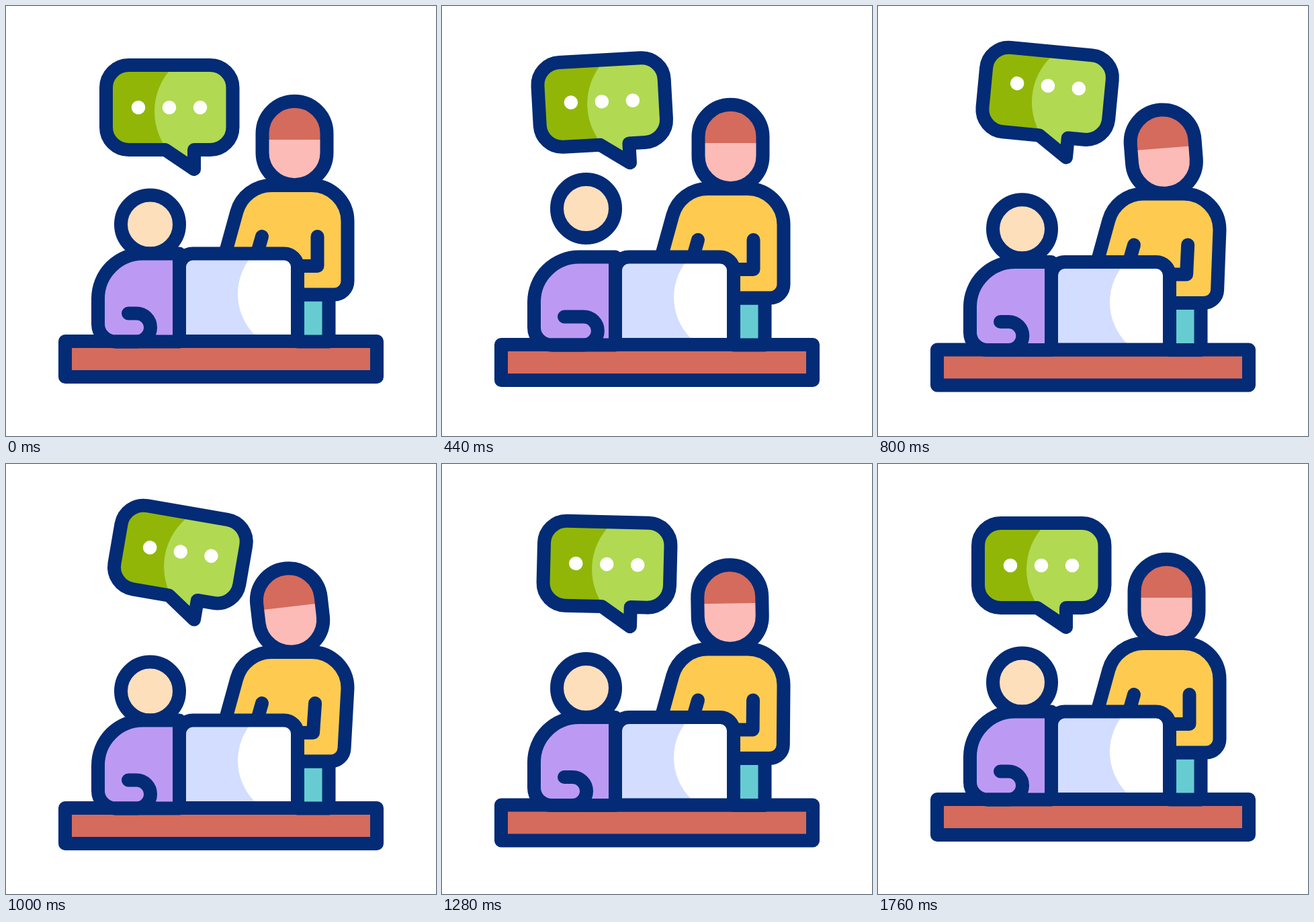
Animation of 640x640 px, one loop 2000 ms. Source, as an HTML page with a canvas:

```html
<!DOCTYPE html>
<html lang="en">
<head>
<meta charset="utf-8">
<title>Desk conversation</title>
<style>
  html, body { margin: 0; width: 100%; height: 100%; overflow: hidden; background: #fff; }
  canvas { display: block; width: 640px; height: 640px; }
</style>
</head>
<body>
<canvas id="stage"></canvas>
<script>
const SIZE = 640, LOOP = 2000, STEP = 40;
const color = {
  navy: '#032b76', brick: '#d56b5c', skin: '#fddfbb', pink: '#fdbbb7',
  yellow: '#fecb50', teal: '#67ccd1', purple: '#bc9af4',
  screen: '#d3ddff', green: '#91b608', lime: '#b1d952', white: '#fff'
};

const canvas = document.getElementById('stage');
const ctx = canvas.getContext('2d');
const ratio = window.devicePixelRatio || 1;
canvas.width = canvas.height = SIZE * ratio;

// Keyframes are [time, value] pairs joined by sine easing.
function track(t, keys) {
  if (t <= keys[0][0]) return keys[0][1];
  for (let i = 1; i < keys.length; i++) {
    const [t0, a] = keys[i - 1], [t1, b] = keys[i];
    if (t < t1) return a + (b - a) * (1 - Math.cos(Math.PI * (t - t0) / (t1 - t0))) / 2;
  }
  return keys[keys.length - 1][1];
}

function path(build) {
  const p = new Path2D();
  build(p);
  return p;
}

function roundRect(x, y, w, h, r) {
  return path(p => p.roundRect(x, y, w, h, r));
}

function circle(x, y, r) {
  return path(p => p.arc(x, y, r, 0, 2 * Math.PI));
}

function fill(shape, c) {
  ctx.fillStyle = c;
  ctx.fill(shape);
}

function outline(shape) {
  ctx.stroke(shape);
}

function solid(shape, c) {
  fill(shape, c);
  outline(shape);
}

// Fills a shape with one colour, lays a second one over part of it, then outlines it.
function twoTone(shape, base, part, top) {
  fill(shape, base);
  ctx.save();
  ctx.clip(shape);
  fill(part, top);
  ctx.restore();
  outline(shape);
}

function rotated(x, y, degrees, draw) {
  ctx.save();
  ctx.translate(x, y);
  ctx.rotate(degrees * Math.PI / 180);
  ctx.translate(-x, -y);
  draw();
  ctx.restore();
}

const table = roundRect(88, 499, 464, 53, 0);
const trousers = roundRect(434, 429.5, 46.5, 70, 0);
const laptop = roundRect(258, 368.5, 176, 130.5, [20, 20, 0, 0]);
const laptopShine = circle(431.5, 428.5, 86.5);
const headTall = roundRect(381.5, 141.7, 96, 124.5, 48);
const hair = path(p => p.rect(370, 130, 120, 69));
const seatedBody = path(p => {
  p.moveTo(258, 368.5);
  p.lineTo(204, 368.5);
  p.arcTo(137, 368.5, 137, 435.5, 67);
  p.arcTo(137, 499.5, 163, 499.5, 26);
  p.lineTo(258, 499.5);
  p.closePath();
});
const bubble = path(p => {
  p.moveTo(280, 243);
  p.lineTo(280, 214);
  p.arcTo(337.5, 214, 337.5, 150, 33.5);
  p.arcTo(337.5, 88, 240, 88, 33.5);
  p.arcTo(149, 88, 149, 150, 33.5);
  p.arcTo(149, 214, 237, 214, 33.5);
  p.lineTo(237, 214);
  p.closePath();
});
const bubbleShine = circle(315, 157, 94);

function drawStanding(lean) {
  solid(trousers, color.teal);

  const hip = 508.5 - 6.2 * lean;
  solid(path(p => {
    p.moveTo(322, 384);
    p.lineTo(343.4, 306.4);
    p.arc(395, 320.5, 53.5, Math.PI + 0.268, 1.5 * Math.PI);
    p.lineTo(455, 267);
    p.arc(455, 320.5, 53.5, -Math.PI / 2, 0);
    p.arcTo(hip, 429.5, 444, 429.5, 20);
    p.lineTo(400, 429.5);
  }), color.yellow);

  outline(path(p => {
    p.moveTo(381, 343);
    p.lineTo(371, 378);
    p.moveTo(463.5 - 3.5 * lean, 343);
    p.lineTo(463.5 - 6.6 * lean, 387);
    p.lineTo(434, 387);
  }));

  rotated(429.5, 265, -6.7 * lean, () => twoTone(headTall, color.pink, hair, color.brick));
}

function drawSeated(jump, reach) {
  solid(circle(214.5, 325 - jump, 43.5), color.skin);
  solid(seatedBody, color.purple);
  outline(path(p => {
    p.moveTo(182, 457.5);
    p.lineTo(194 + reach, 457.5);
    p.arc(194 + reach, 478.5, 21, -Math.PI / 2, Math.PI / 2);
    p.lineTo(163, 499.5);
  }));
}

function drawBubble(t) {
  const rise = track(t, [[110, 0], [740, 18], [1375, 0]]);
  const angle = track(t, [[80, 0], [530, -3.5], [570, -3.5], [950, 10], [957, 10], [1385, 0]]);
  ctx.save();
  ctx.translate(0, -rise);
  rotated(280, 243, angle, () => {
    twoTone(bubble, color.green, bubbleShine, color.lime);
    for (let i = 0; i < 3; i++) {
      const start = 320 + 35 * i;
      const hop = track(t, [[start, 0], [start + 400, 12], [start + 800, 0]]);
      fill(circle(197 + 46 * i, 151 - hop, 10.3), color.white);
    }
  });
  ctx.restore();
}

function draw(t) {
  ctx.setTransform(ratio, 0, 0, ratio, 0, 0);
  ctx.fillStyle = color.white;
  ctx.fillRect(0, 0, SIZE, SIZE);
  ctx.strokeStyle = color.navy;
  ctx.lineWidth = 20;
  ctx.lineCap = ctx.lineJoin = 'round';

  const sink = track(t, [[100, 0], [900, 13], [1035, 13], [1645, 0]]);
  const lean = track(t, [[570, 0], [950, 1], [957, 1], [1385, 0]]);
  const jump = track(t, [[80, 0], [500, 30], [920, 0]]);
  const reach = track(t, [[80, 0], [360, 18], [840, 0]]);

  ctx.save();
  ctx.translate(0, sink);
  solid(table, color.brick);
  drawStanding(lean);
  drawSeated(jump, reach);
  twoTone(laptop, color.screen, laptopShine, color.white);
  ctx.restore();

  drawBubble(t);
}

const began = performance.now();
function tick() {
  const t = (performance.now() - began) % LOOP;
  draw(Math.floor(t / STEP) * STEP);
  requestAnimationFrame(tick);
}
tick();
</script>
</body>
</html>
```
